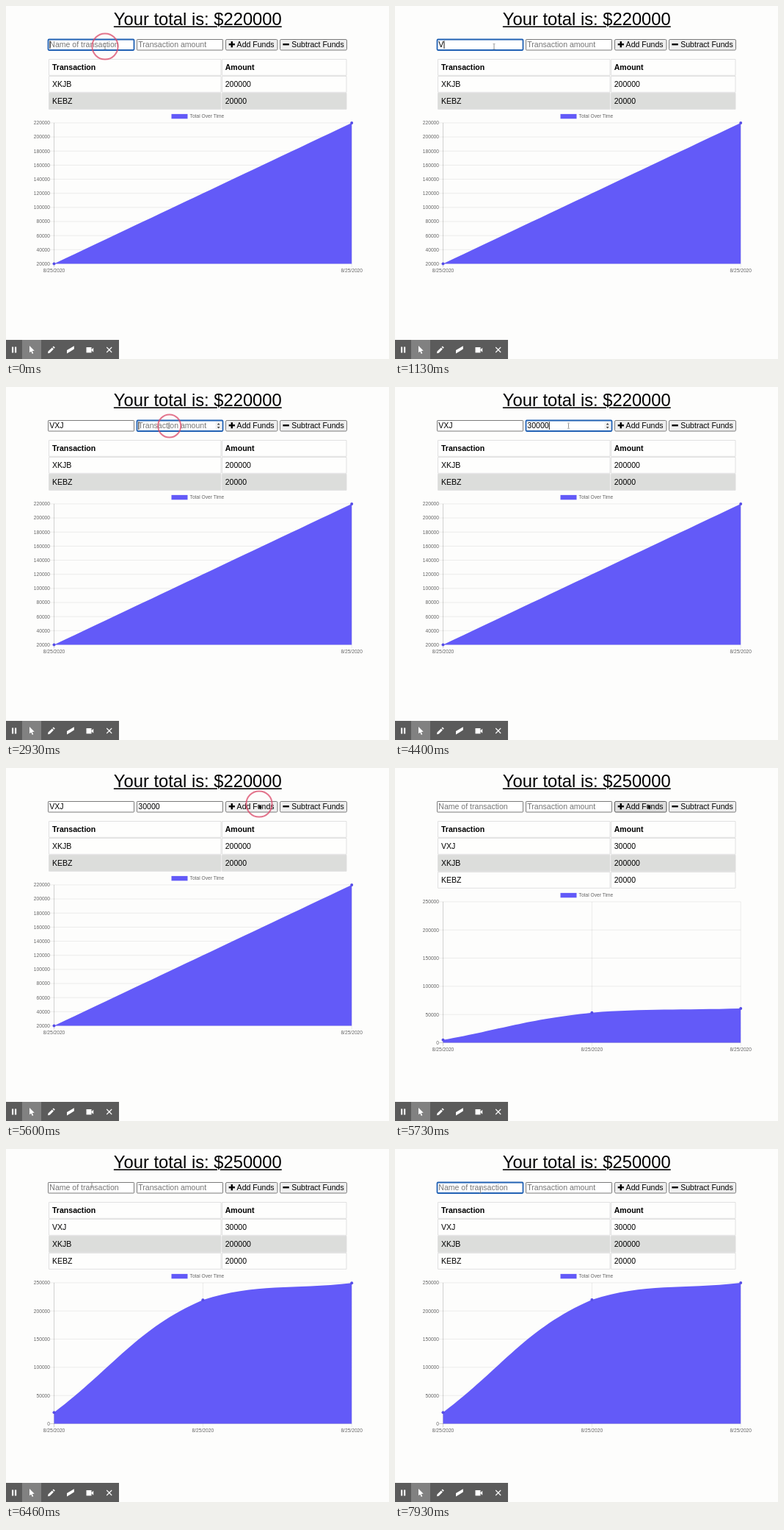
Write an HTML page with a canvas that moves like this. It is 522 by 480 pixels and loops after 8000 ms.

```html
<!DOCTYPE html>
<html lang="en">
<head>
<meta charset="utf-8">
<title>Transaction tracker</title>
<style>
  html, body { margin: 0; width: 100%; height: 100%; overflow: hidden; background: #fdfdfc; }
  canvas { display: block; }
</style>
</head>
<body>
<canvas id="stage" width="522" height="480"></canvas>
<script>
const ctx = document.getElementById('stage').getContext('2d');
const LOOP = 8000;
const SUBMIT = 5725;       // new row appears
const CHART_START = 5664;  // chart grows for one second
const BLUE = '#635af8';
const SANS = '"Liberation Sans", Arial, sans-serif';

const FIELDS = [
  { x: 57.5, w: 117, hint: 'Name of transaction' },
  { x: 178.5, w: 117, hint: 'Transaction amount' }
];
const FOCUS = [
  { field: 0, from: -70, to: 2845 },
  { field: 1, from: 2845, to: 5480 },
  { field: 0, from: 7400, to: LOOP }
];
const TYPING = [
  { text: 'VXJ', times: [990, 1260, 1530] },
  { text: '30000', times: [3200, 3330, 3460, 3730, 3930] }
];
const CLICKS = [
  { t: -130, x: 135, y: 55 },
  { t: 2845, x: 222.7, y: 53 },
  { t: 5480, x: 345, y: 49 },
  { t: 7400, x: 116.5, y: 56 }
];
const MOUSE = [
  [0, 135, 55], [1930, 135, 55], [2790, 222, 53], [4130, 222, 53],
  [5400, 346, 50], [5800, 346, 50], [6440, 117, 49], [6730, 117, 49],
  [7350, 116.5, 56], [LOOP, 116.5, 56]
];
const OLD_ROWS = [['XKJB', '200000'], ['KEBZ', '20000']];
const NEW_ROWS = [['VXJ', '30000'], ...OLD_ROWS];

function text(str, x, y, { size = 10.55, color = '#000', bold = false, align = 'left' } = {}) {
  ctx.font = `${bold ? 'bold ' : ''}${size}px ${SANS}`;
  ctx.fillStyle = color;
  ctx.textAlign = align;
  ctx.fillText(str, x, y);
}

function rect(x, y, w, h, color) {
  ctx.fillStyle = color;
  ctx.fillRect(x, y, w, h);
}

function box(x, y, w, h, r, fill, stroke, lw = 1) {
  ctx.beginPath();
  ctx.roundRect(x, y, w, h, r);
  ctx.fillStyle = fill;
  ctx.fill();
  ctx.strokeStyle = stroke;
  ctx.lineWidth = lw;
  ctx.stroke();
}

function line(x1, y1, x2, y2, color, lw) {
  ctx.beginPath();
  ctx.moveTo(x1, y1);
  ctx.lineTo(x2, y2);
  ctx.strokeStyle = color;
  ctx.lineWidth = lw;
  ctx.stroke();
}

function poly(points, color) {
  ctx.beginPath();
  points.forEach(([x, y]) => ctx.lineTo(x, y));
  ctx.closePath();
  ctx.fillStyle = color;
  ctx.fill();
}

function mouseAt(t) {
  const i = MOUSE.findIndex((key, n) => n > 0 && t <= key[0]);
  const [t0, x0, y0] = MOUSE[i - 1];
  const [t1, x1, y1] = MOUSE[i];
  const p = (t - t0) / (t1 - t0);
  const e = p * p * (3 - 2 * p);
  return { x: x0 + (x1 - x0) * e, y: y0 + (y1 - y0) * e };
}

const inside = (m, x, w) => m.x >= x && m.x <= x + w && m.y > 45 && m.y < 60.5;

function heading(total) {
  const label = 'Your total is: ';
  const size = 23.76;
  ctx.font = `${size}px ${SANS}`;
  const w = ctx.measureText(label + total).width;
  const left = 261.3 - w / 2;
  const stem = left + ctx.measureText(label).width + size * 0.278;
  text(label + total, left, 26, { size });
  rect(left, 27.4, stem - 2 - left, 1.6, '#000');
  rect(stem + 2, 27.4, left + w - stem - 2, 1.6, '#000');
}

function drawField(i, t, mouse) {
  const { x, w, hint } = FIELDS[i];
  const focus = FOCUS.find(f => f.field === i && t >= f.from && t < f.to);
  const { text: full, times } = TYPING[i];
  const typed = t < SUBMIT ? times.filter(k => k <= t) : [];
  const value = full.slice(0, typed.length);

  if (focus) box(x, 45.5, w, 14.5, 1.2, '#fff', '#2262b4', 1.8);
  else box(x, 45.5, w, 14.5, 0.6, '#fff', '#7b7b7b');
  text(value || hint, x + 1.8, 56, { color: value ? '#000' : '#757575' });

  if (focus) {
    const since = Math.max(focus.from, ...typed);
    if ((t - since) % 1000 < 500) {
      const cx = x + 2 + (value ? ctx.measureText(value).width : 0);
      rect(cx, 47.4, 0.9, 10.6, '#000');
    }
  }
  if (i === 1 && (focus || inside(mouse, x, w))) {
    rect(x + 107, 47.5, 8, 10.5, '#f1f1f1');
    poly([[x + 109.3, 51.4], [x + 111.2, 48.9], [x + 113.1, 51.4]], '#444');
    poly([[x + 109.3, 54], [x + 111.2, 56.5], [x + 113.1, 54]], '#444');
  }
}

function drawButtons(t, mouse) {
  const pressed = t >= 5480 && t < CHART_START;
  const hover = inside(mouse, 299.5, 70.5) && !pressed;
  box(299.5, 45.5, 70.5, 14.5, 1.6, hover ? '#dedede' : '#efefef', hover ? '#555' : '#7b7b7b');
  rect(303.7, 51, 8.2, 2.4, '#000');
  rect(306.6, 48.1, 2.4, 8.2, '#000');
  text('Add Funds', 314.6, 56);

  box(373.5, 45.5, 91, 14.5, 1.6, '#efefef', '#7b7b7b');
  rect(377.4, 51, 8.4, 2.4, '#000');
  text('Subtract Funds', 389.2, 56);
}

function drawTable(rows) {
  [['Transaction', 'Amount'], ...rows].forEach((row, i) => {
    const y = 72.5 + i * 23;
    const fill = i && i % 2 === 0 ? '#dcdddb' : '#fefefd';
    box(58.5, y, 234.5, 21.8, 0, fill, '#dedede', 0.9);
    box(294.5, y, 169.5, 21.8, 0, fill, '#dedede', 0.9);
    row.forEach((cell, n) => text(cell, n ? 298.7 : 63, y + 14.2, { bold: i === 0 }));
  });
}

// Cardinal spline handles, kept inside the plot area
function handles(a, p, b, top, bottom) {
  const before = Math.hypot(p.x - a.x, p.y - a.y);
  const after = Math.hypot(b.x - p.x, b.y - p.y);
  const cap = y => Math.max(top, Math.min(bottom, y));
  const at = k => ({ x: p.x + k * (b.x - a.x), y: cap(p.y + k * (b.y - a.y)) });
  const sum = before + after;
  return { prev: at(-0.4 * before / sum), next: at(0.4 * after / sum) };
}

function drawChart({ top, min, step, ticks, values }, grow) {
  const left = 65.5, right = 471.2, height = 191.6;
  const bottom = top + height;
  const small = { size: 6.65, color: '#666' };
  const gap = (right - left) / (values.length - 1);

  rect(225.5, top - 12, 22, 6.4, BLUE);
  text('Total Over Time', 250.6, top - 6.5, small);

  for (let i = 0; i <= ticks; i++) {
    const y = bottom - height * i / ticks;
    const value = min + i * step;
    line(60.5, y, right, y, `rgba(0,0,0,${value ? 0.1 : 0.25})`, 0.7);
    text(String(value), 60, y + 2.4, { ...small, align: 'right' });
  }
  const pts = values.map((v, i) => ({
    x: left + i * gap,
    y: bottom - height * (v - min) / (ticks * step)
  }));
  pts.forEach((p, i) => {
    line(p.x, top, p.x, bottom + 5, `rgba(0,0,0,${i ? 0.1 : 0.25})`, 0.7);
    text('8/25/2020', p.x, bottom + 11.8, { ...small, align: 'center' });
  });

  const ctl = pts.map((p, i) => handles(pts[i - 1] || p, p, pts[i + 1] || p, top, bottom));
  const up = y => bottom + (y - bottom) * grow;
  ctx.beginPath();
  ctx.moveTo(left, bottom);
  ctx.lineTo(left, up(pts[0].y));
  for (let i = 1; i < pts.length; i++) {
    const a = ctl[i - 1].next, b = ctl[i].prev;
    ctx.bezierCurveTo(a.x, up(a.y), b.x, up(b.y), pts[i].x, up(pts[i].y));
  }
  ctx.lineTo(right, bottom);
  ctx.closePath();
  ctx.fillStyle = BLUE;
  ctx.fill();
  pts.forEach(p => {
    ctx.beginPath();
    ctx.arc(p.x, up(p.y), 2, 0, 7);
    ctx.fillStyle = '#564de6';
    ctx.fill();
  });
}

function drawToolbar() {
  const w = '#fff';
  rect(0, 454, 154, 26, '#5b5b5b');
  rect(22, 454, 26, 26, '#818181');
  rect(8, 463.5, 2.2, 8, w);
  rect(12, 463.5, 2.2, 8, w);
  poly([[32, 462], [32, 471.3], [34.2, 469.4], [35.8, 473], [37.3, 472.3], [35.7, 468.9], [38.7, 468.7]], w);
  poly([[57, 472.3], [57.6, 469.6], [62.8, 464.4], [64.9, 466.5], [59.7, 471.7]], w);
  poly([[63.5, 463.7], [64.8, 462.5], [66.8, 464.5], [65.6, 465.8]], w);
  poly([[83, 468], [92.8, 462.3], [92.8, 466.4], [88.5, 469.2], [83, 472.6]], w);
  rect(109.5, 464, 7, 7.4, w);
  poly([[116, 467.7], [119.2, 464.7], [119.2, 470.7]], w);
  line(137.2, 464, 144.2, 471, w, 1.1);
  line(144.2, 464, 137.2, 471, w, 1.1);
}

function drawCursor({ x, y }, beam) {
  if (beam) {
    line(x, y - 3, x, y + 3, '#777', 0.8);
    line(x - 1.5, y - 3.6, x + 1.5, y - 3.6, '#888', 0.7);
    line(x - 1.5, y + 3.6, x + 1.5, y + 3.6, '#888', 0.7);
    return;
  }
  const shape = [[0, 0], [0, 6.4], [1.5, 5.2], [2.5, 7.4], [3.5, 7], [2.6, 4.8], [4.6, 4.6]];
  poly(shape.map(([dx, dy]) => [x - 1.5 + dx, y - 1 + dy]), '#111');
}

function drawClicks(t) {
  for (const c of CLICKS) {
    const age = t - c.t;
    if (age < 0 || age > 230) continue;
    ctx.beginPath();
    ctx.arc(c.x, c.y, 17.6 * Math.sqrt(Math.min(1, age / 110)), 0, 7);
    ctx.strokeStyle = 'rgba(219,72,104,0.75)';
    ctx.lineWidth = 2;
    ctx.stroke();
  }
}

const OLD_CHART = { top: 158.9, min: 20000, step: 20000, ticks: 10, values: [20000, 220000] };
const NEW_CHART = { top: 181.9, min: 0, step: 50000, ticks: 5, values: [20000, 220000, 250000] };

function draw(t) {
  const done = t >= SUBMIT;
  const mouse = mouseAt(t);
  rect(0, 0, 522, 480, '#fdfdfc');
  heading(done ? '$250000' : '$220000');
  FIELDS.forEach((f, i) => drawField(i, t, mouse));
  drawButtons(t, mouse);
  drawTable(done ? NEW_ROWS : OLD_ROWS);
  const p = Math.min(1, (t - CHART_START) / 1000);
  if (done) drawChart(NEW_CHART, 1 - (1 - p) ** 4);
  else drawChart(OLD_CHART, 1);
  drawToolbar();
  drawCursor(mouse, FIELDS.some(f => inside(mouse, f.x, f.w)));
  drawClicks(t);
}

const start = performance.now();
function tick() {
  draw((performance.now() - start) % LOOP);
  requestAnimationFrame(tick);
}
tick();
</script>
</body>
</html>
```
